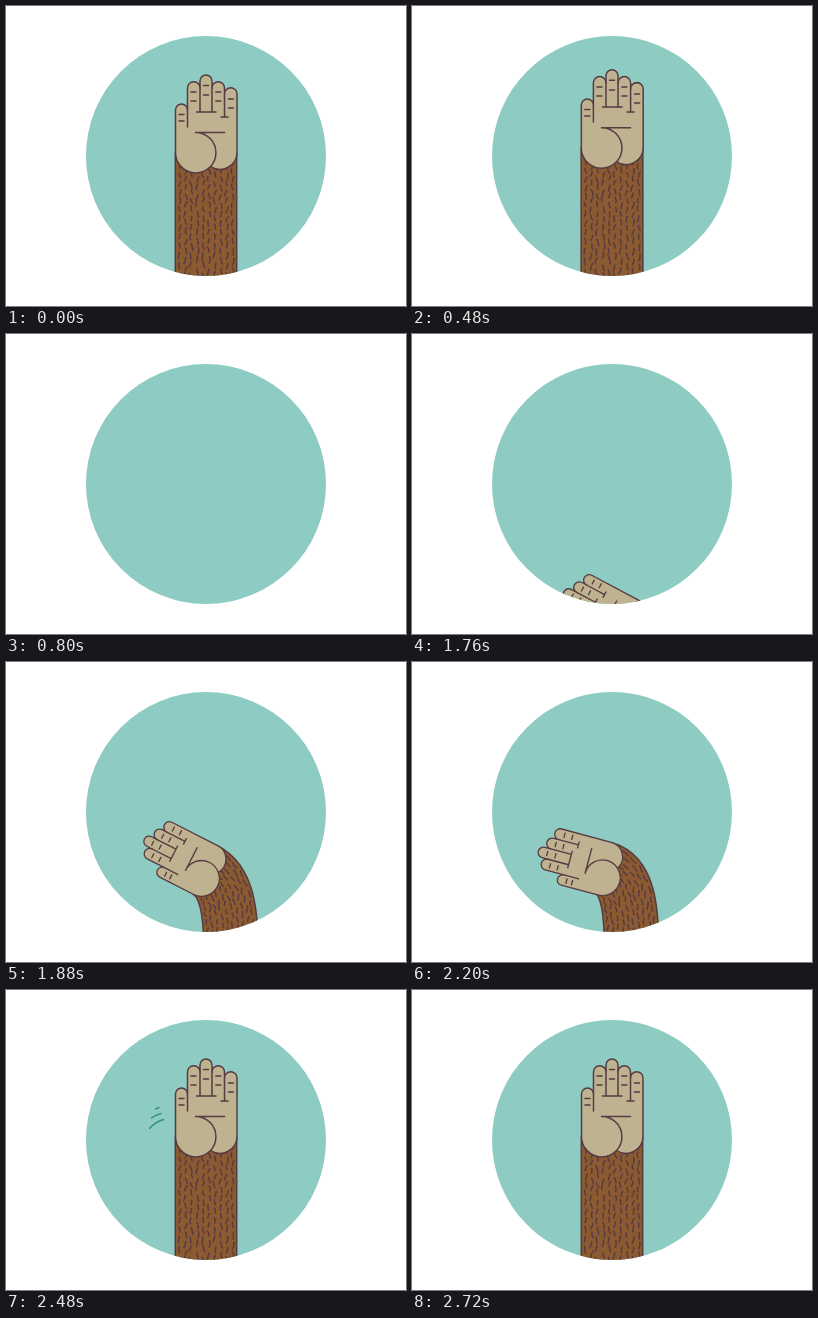
An HTML page for the animation above (3840 ms loop, 400 by 300 pixels).

```html
<!DOCTYPE html>
<html lang="en">
<head>
<meta charset="utf-8">
<title>Furry hand</title>
<style>
  html, body { margin: 0; width: 100%; height: 100%; overflow: hidden; background: #fff; }
  svg { display: block; width: 100vw; height: 100vh; }
  .line { fill: none; stroke: #563b40; stroke-width: 1.5; stroke-linecap: round; stroke-linejoin: round; }
  .skin { fill: #beb291; }
  .fur { fill: #8c5a30; }
  .swish { fill: none; stroke: #348f8b; stroke-width: 1.5; stroke-linecap: round; }
</style>
</head>
<body>
<svg viewBox="0 0 400 300">
  <clipPath id="disc"><circle cx="200" cy="150" r="120"/></clipPath>
  <circle cx="200" cy="150" r="120" fill="#8ecbc2"/>
  <g clip-path="url(#disc)">
    <g id="swishes">
      <path class="swish" pathLength="1" d="M140.5 143Q146 133 157.5 129.5"/>
      <path class="swish" pathLength="1" d="M143 130Q148 125.5 155 123.5"/>
      <path class="swish" pathLength="1" d="M148.5 119.5L153 117.5"/>
    </g>
    <g id="limb">
      <path id="arm" class="line fur"/>
      <path id="hairs" class="line"/>
      <g id="hand">
        <path class="line skin" d="M169.5 146.5V104a6 6 0 0 1 12 0V82a6.25 6.25 0 0 1 12.5 0V75a6 6 0 0 1 12 0V82a6.25 6.25 0 0 1 12.5 0V88a6.25 6.25 0 0 1 12.5 0V146A17 17 0 0 1 204 160"/>
        <path class="line skin" d="M218.5 126.5H189.5A20.2 20.2 0 1 1 169.5 146.5"/>
        <path class="line" d="M181.5 104V121M194 82V106M206 82V106M190.5 106H210M218.5 88V111M215 111H222"/>
        <path id="creases" class="line"/>
      </g>
    </g>
  </g>
</svg>
<script>
const LOOP = 3840, STEP = 40;
const $ = id => document.getElementById(id);
const lerp = (a, b, p) => a + (b - a) * p;
const fix = n => n.toFixed(2);

// x, y: wrist; bx, by: foot of the arm
const UPRIGHT = { x: 200, y: 147, rot: 0, scale: 1, bx: 200, by: 290 };
const LOW = { x: 213, y: 290, rot: -62, scale: .885, bx: 238, by: 373 };
const READY = { x: 199, y: 203, rot: -63, scale: .885, bx: 224, by: 290 };
const WOUND = { x: 193, y: 207, rot: -75, scale: .885, bx: 219.5, by: 290 };

function mix(a, b, p) {
  const pose = {};
  for (const key in a) pose[key] = lerp(a[key], b[key], p);
  return pose;
}

function sinkPose(t) {
  const u = (t - 520) / 280;
  const drop = u < 0 ? -6 * Math.sin((t - 400) / 120 * Math.PI / 2) : -6 + 216 * u * u;
  const scale = Math.max(.885, 1 - .00115 * drop);
  const y = 69 + drop + 78 * scale;
  return { x: 200, y, rot: 0, scale, bx: 200, by: y + 143 * scale };
}

function poseAt(t) {
  if (t < 440) return UPRIGHT;
  if (t < 800) return sinkPose(t);
  if (t < 1760) return null;
  if (t < 1920) return mix(LOW, READY, 1 - (1 - (t - 1760) / 160) ** 2);
  if (t < 2200) return READY;
  if (t < 2400) {
    const u = (t - 2200) / 200;
    return mix(WOUND, UPRIGHT, u * u * (3 - 2 * u));
  }
  return UPRIGHT;
}

let seed = 7;
function random() {
  seed = (seed * 16807) % 2147483647;
  return seed / 2147483647;
}

// Hairs lie at a sideways offset and a distance below the wrist.
const hairs = [];
for (let col = 0; col < 10; col++) {
  for (let row = 0; row < 15; row++) {
    hairs.push({
      side: -26.5 + col * 5.9 + (random() - .5) * 2,
      down: 6 + row * 9.2 + (col % 2) * 4.6 + (random() - .5) * 2.5,
      lean: (random() - .5) * 4.4,
      bow: (random() - .5) * 3,
      half: 2.3 + random() * .9
    });
  }
}

const creases = [[175.5, 108.5, 115], [187.5, 86, 95], [200, 79.5, 89], [212.3, 86, 95], [225, 93, 102]];
$('creases').setAttribute('d', creases.map(([x, ...rows]) =>
  rows.map(y => `M${x - 2.5} ${y}h5`).join('')).join(''));

// Returns a function that places (side, down) along the bent arm.
function armSpace({ x, y, rot, scale, bx, by }) {
  const angle = rot * Math.PI / 180;
  const chord = Math.hypot(x - bx, y - by);
  const px = [x, x - Math.sin(angle) * chord * .3, bx, bx];
  const py = [y, y + Math.cos(angle) * chord * .3, by - chord * .4, by];
  const length = chord * (1 + .07 * Math.abs(rot) / 75);
  const point = (p, t) => (1 - t) ** 3 * p[0] + 3 * t * (1 - t) ** 2 * p[1] + 3 * t * t * (1 - t) * p[2] + t ** 3 * p[3];
  const slope = (p, t) => (1 - t) ** 2 * (p[1] - p[0]) + 2 * t * (1 - t) * (p[2] - p[1]) + t * t * (p[3] - p[2]);
  return (side, down) => {
    const t = Math.min(1, Math.max(0, down * scale / length));
    const dx = slope(px, t), dy = slope(py, t);
    const k = side * scale / Math.hypot(dx, dy);
    return `${fix(point(px, t) + dy * k)} ${fix(point(py, t) - dx * k)}`;
  };
}

function drawLimb(pose) {
  $('limb').style.display = pose ? '' : 'none';
  if (!pose) return;
  const { x, y, rot, scale, bx, by } = pose;
  const at = armSpace(pose);
  const reach = Math.hypot(x - bx, y - by) * (1 + .07 * Math.abs(rot) / 75) / scale;
  const left = [], right = [];
  for (let i = 0; i <= 20; i++) {
    left.push(at(-30.7, reach * i / 20));
    right.unshift(at(30.7, reach * i / 20));
  }
  $('arm').setAttribute('d', `M${left.concat(right).join('L')}Z`);
  $('hairs').setAttribute('d', hairs.filter(h => h.down + h.half < reach).map(h =>
    `M${at(h.side - h.lean / 2, h.down - h.half)}Q${at(h.side + h.bow, h.down)} ${at(h.side + h.lean / 2, h.down + h.half)}`
  ).join(''));
  $('hand').setAttribute('transform',
    `translate(${fix(x)} ${fix(y)}) rotate(${fix(rot)}) scale(${scale.toFixed(4)}) translate(-200 -147)`);
}

function drawSwishes(t) {
  const shown = t > 2320 && t < 2720;
  $('swishes').style.display = shown ? '' : 'none';
  if (!shown) return;
  const head = Math.min(1, (t - 2320) / 80);
  const tail = Math.max(0, (t - 2400) / 320);
  for (const path of $('swishes').children) {
    path.setAttribute('stroke-dasharray', `${fix(head - tail)} 2`);
    path.setAttribute('stroke-dashoffset', fix(-tail));
  }
}

const start = performance.now();
function render() {
  const elapsed = (performance.now() - start) % LOOP;
  const t = Math.floor(elapsed / STEP) * STEP;
  drawLimb(poseAt(t));
  drawSwishes(t);
  requestAnimationFrame(render);
}
render();
</script>
</body>
</html>
```
